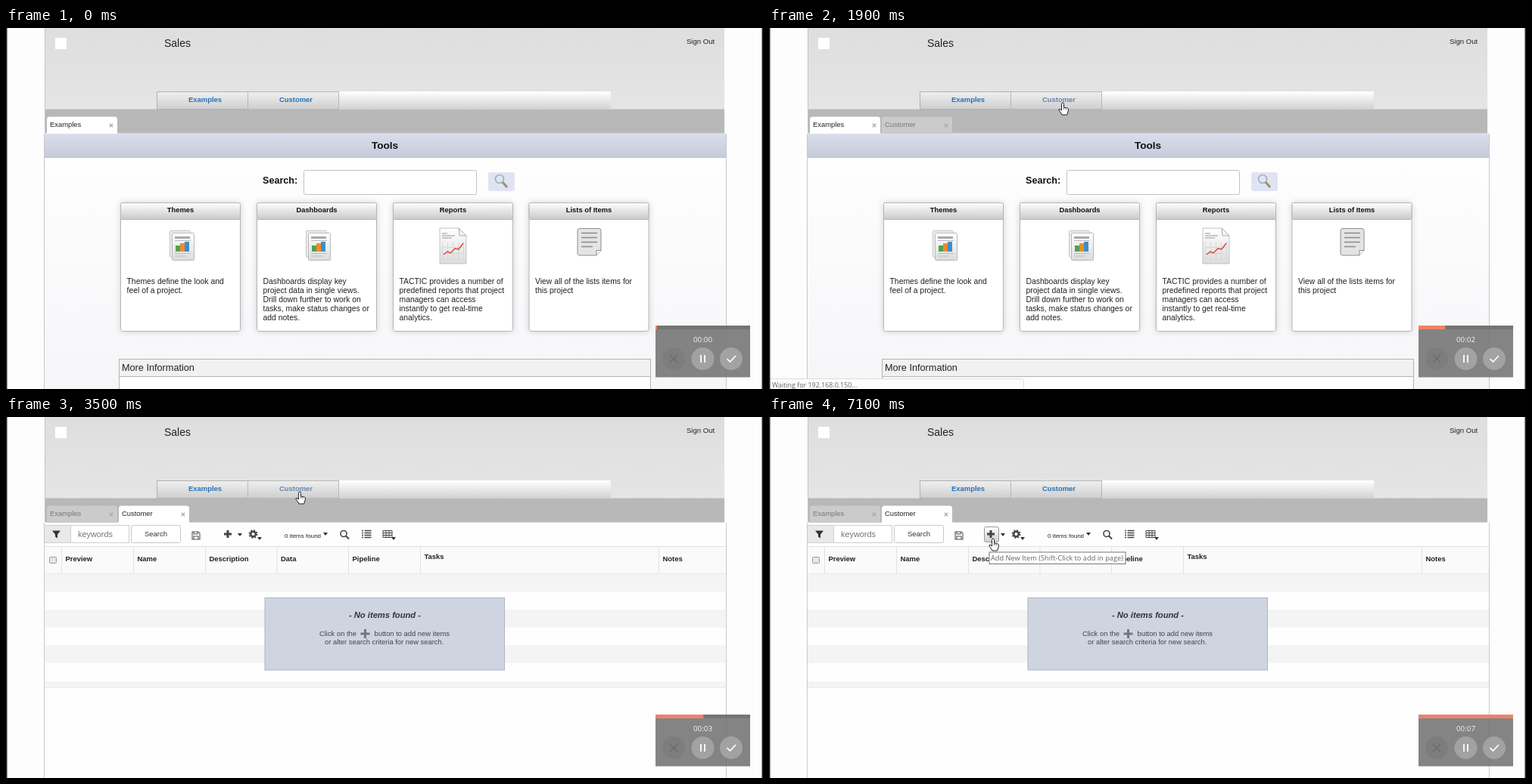
Write an HTML page that moves like this. It is 1000 px wide and 478 px high and loops after 7200 ms.

```html
<!DOCTYPE html>
<html lang="en">
<head>
<meta charset="utf-8">
<title>Sales tools</title>
<style>
html, body { margin: 0; width: 100%; height: 100%; overflow: hidden; background: #fdfdfd }
svg { display: block; width: 100vw; height: 100vh }
text { font-family: "Liberation Sans", Arial, sans-serif; white-space: pre }
.ui { font-family: "Open Sans", "Noto Sans", sans-serif }
.b { font-weight: bold }
.i { font-style: italic }
.m { text-anchor: middle }
</style>
</head>
<body>
<svg id="stage" viewBox="0 0 1000 478" preserveAspectRatio="none"></svg>
<script>
const LOOP = 7200, STEP = 100;

const rect = (x, y, w, h, fill, more = '') =>
  `<rect x="${x}" y="${y}" width="${w}" height="${h}" fill="${fill}" ${more}/>`;
const box = (x, y, w, h, fill, stroke, r = 0, more = '') =>
  rect(x + .5, y + .5, w - 1, h - 1, fill, `stroke="${stroke}" rx="${r}" ${more}`);
const text = (x, y, size, str, cls = '', fill = '#222', more = '') =>
  `<text x="${x}" y="${y}" font-size="${size}" class="${cls}" fill="${fill}" ${more}>${str}</text>`;
const path = (d, stroke, width = 1, fill = 'none') =>
  `<path d="${d}" stroke="${stroke}" stroke-width="${width}" fill="${fill}"/>`;
const circle = (x, y, r, fill, more = '') =>
  `<circle cx="${x}" cy="${y}" r="${r}" fill="${fill}" ${more}/>`;
const group = (id, body, more = '') => `<g id="${id}" ${more}>${body}</g>`;
const grad = (id, a, b) => `<linearGradient id="${id}" x2="0" y2="1">
  <stop stop-color="${a}"/><stop offset="1" stop-color="${b}"/></linearGradient>`;
const cross = (x, y, r, color, w = 1.3) =>
  path(`M${x - r} ${y - r}l${2 * r} ${2 * r}m0 ${-2 * r}l${-2 * r} ${2 * r}`, color, w);
const plus = (x, y, r, color) => path(`M${x - r} ${y}h${2 * r}M${x} ${y - r}v${2 * r}`, color, 3);
const caret = (x, y) => path(`M${x - 3} ${y}h6l-3 4z`, 'none', 0, '#333');

const defs = `<defs>
  ${grad('head', '#dedede', '#e5e5e5')}${grad('tab', '#f0f0f0', '#cecece')}
  ${grad('nav', '#ffffff', '#d2d2d2')}${grad('bar', '#d9deea', '#c6cbdb')}
  ${grad('page', '#ffffff', '#f6f5f8')}${grad('title', '#ffffff', '#c9c9c9')}
  ${grad('btn', '#ffffff', '#cfcfcf')}${grad('sheet', '#ffffff', '#dcdcdc')}
  <filter id="soft" x="-10%" y="-10%" width="120%" height="120%">
    <feDropShadow dx="0" dy="0" stdDeviation="4" flood-opacity=".16"/></filter>
</defs>`;

const header =
  rect(52, 0, 897, 108, 'url(#head)') + rect(52, 107.5, 897, 32, '#b8b8b8') +
  group('wide', rect(948, 0, 2.5, 108, '#e2e2e2') + rect(948, 107.5, 2.5, 32, '#b8b8b8')) +
  rect(51, 0, 1, 139, '#c4c4c4') +
  rect(65, 13, 15, 15, '#ffffff') +
  text(209, 24.5, 14, 'Sales') +
  group('signOut', text(899, 20.5, 9.55, 'Sign Out')) +
  group('nav',
    rect(439, 84, 360, 23.5, 'url(#nav)') +
    box(199, 84, 121, 24, 'url(#tab)', '#b0b0b0') + box(319, 84, 121, 24, 'url(#tab)', '#b8b8b8') +
    text(263, 98, 9.45, 'Examples', 'b m', '#2672b8') +
    text(383, 98, 9.45, 'Customer', 'b m', '#2672b8', 'id="link"'));

const pageTab = (id, x, label) => group(id,
  path(`M${x} 140V121q0-3.500 3.500-3.500h86q3.500 0 3.500 3.500V140z`, 'none', 0, '#fff') +
  text(x + 4, 131, 9.4, label) + cross(x + 85, 129, 2.2, '#aaa'));

const bars = (x, y) =>
  rect(x, y + 5, 6, 8, '#4fa34a') + rect(x + 6, y + 2, 6, 11, '#ef8a31') + rect(x + 12, y, 6, 13, '#3f8fc4');

const dashIcon = x =>
  box(x - 15, 268, 28, 36, '#eee', '#c4c4c4', 1) +
  box(x - 12, 271, 30, 37, 'url(#sheet)', '#b8b8b8', 1) +
  rect(x - 8, 276, 20, 3, '#aaa') + path(`M${x - 8} 281.500h21M${x - 8} 298.500h21M${x - 8} 302h15`, '#bbb') +
  bars(x - 7, 283);

const reportIcon =
  path('M573 265h25l10 10v37h-35z', '#c2c2c2', 1, 'url(#sheet)') +
  path('M598 265l1 10h9z', '#aaa', 1, '#f4f4f4') + path('M576 272h7M576 275h17M576 278h13', '#999', 1) +
  path('M576.500 283v23h28M583.500 283v23M590.500 283v23M597.500 283v23M604.500 283v23M576 290.500h28M576 298.500h28', '#d2d2d2', .7) +
  path('M578 300l5-4 4 2 6-6 5 1 6-8', '#d9403c', 1.4);

const listIcon =
  path('M758 265.500h25q3 0 3 3v26l-6 6.500h-22q-3 0-3-3v-29.500q0-3 3-3z', '#8c8c8c', 1, '#e4e4e4') +
  path('M786 294.500h-6v6.500', '#8c8c8c', 1, '#fff') +
  path('M760 271.500h21M760 277.500h21M760 283.500h21M760 289.500h15', '#8a8a8a', 1.5);

const card = (x, label, icon, lines, id) =>
  box(x, 231, 159, 171, '#fff', '#b5b5b5', 3, `filter="url(#soft)" ${id ? `id="${id}"` : ''}`) +
  box(x, 231, 159, 23, 'url(#title)', '#b5b5b5', 2) +
  text(x + 79.5, 244.3, 9.4, label, 'b m', '#111') + icon +
  lines.map((s, i) => text(x + 8.5, 338.5 + 12.1 * i, 10.4, s)).join('');

const tools = group('tools',
  rect(50, 140, 901, 338, 'url(#page)') + rect(50, 140, 901, 31, 'url(#bar)') +
  path('M50 171.500h901', '#c0c4d0') + path('M50.500 140v338M951.500 140v338', '#c8c8cc') +
  text(500.5, 160, 13.6, 'Tools', 'b m', '#111') +
  text(339, 205.500, 12.6, 'Search:', 'b', '#111') +
  box(393, 188, 229, 33, '#fff', '#c2c2c6', 2) +
  rect(637, 191, 35, 25, '#e0e4f2', 'rx="3"') +
  path('M656 204l6 7', '#a08b78', 3) + circle(652, 200, 5.500, '#d8e8f5', 'stroke="#a3abb8" stroke-width="1.500"') +
  card(151, 'Themes', dashIcon(231), ['Themes define the look and', 'feel of a project.']) +
  card(331, 'Dashboards', dashIcon(411), ['Dashboards display key', 'project data in single views.',
    'Drill down further to work on', 'tasks, make status changes or', 'add notes.']) +
  card(511, 'Reports', reportIcon, ['TACTIC provides a number of', 'predefined reports that project',
    'managers can access', 'instantly to get real-time', 'analytics.']) +
  card(690.5, 'Lists of Items', listIcon, ['View all of the lists items for', 'this project'], 'listCard') +
  box(149, 438, 703, 60, '#fdfdfd', '#b5b5b5') + box(149, 438, 703, 24, '#f1f1f1', '#b5b5b5') +
  text(153, 454, 12.7, 'More Information'));

const dots = Array.from({length: 8}, (_, i) => {
  const a = i * Math.PI / 4;
  return circle(3 * Math.cos(a), 3 * Math.sin(a), .7, '#555', `opacity="${i / 8}"`);
}).join('');

const loading = group('loading',
  box(49.5, 139, 904, 360, '#fefefe', '#bdbdbd', 3) +
  box(441, 140, 136, 21.5, '#efefef', '#9a9a9a') +
  group('spin', dots) + text(493, 153.5, 9.6, 'Loading ...', 'b', '#222'));

const columns = [['Preview', 73], ['Name', 168], ['Description', 263], ['Data', 357.5], ['Pipeline', 452], ['Tasks', 547], ['Notes', 862]];

const toolbar =
  box(50, 143, 36, 24, '#e9e9e9', '#d0d0d0') + path('M61 150.500h11l-4 5v5l-3-2v-3z', 'none', 0, '#333') +
  box(85, 143, 78, 24, '#fff', '#d0d0d0') + text(95, 158.500, 10.9, 'keywords', '', '#777') +
  box(165, 143, 66, 24, '#fff', '#c8c8c8', 2) + text(198, 157.8, 9.5, 'Search', 'm', '#333') +
  path('M246 152h8l2 2v8h-10zM248 152v3h5v-3M248 162v-4h6v4', '#555', 1.1) +
  group('addHover', box(284, 145, 20, 21, 'url(#btn)', '#999', 2)) +
  plus(293, 155, 5, '#444') + caret(309, 154) +
  circle(326.500, 155, 3.3, 'none', 'stroke="#444" stroke-width="2.400"') +
  circle(326.500, 155, 5, 'none', 'stroke="#444" stroke-width="1.800" stroke-dasharray="2 1.930"') + caret(335, 159) +
  text(368, 159.500, 8, '0 items found', '', '#222') + caret(422, 153) +
  circle(446, 154.500, 4, 'none', 'stroke="#444" stroke-width="1.600"') + path('M449 157.500l4 4', '#444', 2) +
  path('M470 150.500h2m1.500 0h9M470 153.500h2m1.500 0h9M470 156.500h2m1.500 0h9M470 159.500h2m1.500 0h9', '#444', 1.6) +
  path('M498 150.500h12v9h-12zM498 153.500h12M498 156.500h12M502 150v9M506 150v9', '#444', 1) + caret(512, 159);

const table = group('table',
  rect(50, 140, 901, 338, '#fefefe') + toolbar +
  rect(50, 171, 901, 37, '#fafafa') + path('M50 171.500h901M50 207.500h901', '#e2e2e2') +
  [207.5, 255, 302, 350].map((y, i) => rect(50, y, 901, i < 3 ? 23.700 : 8, '#f4f4f4')).join('') +
  path('M50 358h901', '#e4e4e4') +
  columns.map(([s, x]) => path(`M${x + .5} 171v37`, '#e2e2e2') +
    text(x + 5.500, s === 'Tasks' ? 187.500 : 191, 9.45, s, 'b', '#222')).join('') +
  box(57, 185, 10, 9, '#e6e6e6', '#999', 1) +
  path('M50.500 140v338M951.500 140v338', '#cacaca') +
  box(341.5, 239, 317.5, 96.5, '#cfd4e1', '#aeb3c2') +
  text(500.500, 266, 11.2, '- No items found -', 'b i m', '#333') +
  text(414, 290, 9.4, 'Click on the', '', '#444') + plus(474.500, 287, 6, '#777') +
  text(486.500, 290, 9.4, 'button to add new items', '', '#444') +
  text(421, 300.500, 9.4, 'or alter search criteria for new search.', '', '#444'));

const status = group('status', box(-1, 464, 338, 16, '#fcfcfc', '#dedede', 2) +
  text(4, 476, 8.9, 'Waiting for 192.168.0.150...', 'ui', '#666'));

const tooltip = group('tooltip', box(290.5, 178.5, 181, 16.5, '#fff', '#777') +
  text(293, 190.3, 9.25, 'Add New Item (Shift-Click to add in page)', 'ui', '#666'));

const recorder = rect(858, 394, 125, 68.5, '#737373', 'opacity=".88"') +
  rect(858, 394, 125, 5, '#747474') + rect(858, 394, 0, 5, '#ee8266', 'id="progress"') +
  text(920.5, 415.5, 9.8, '00:00', 'ui m', '#f4f4f4', 'id="clock"') +
  circle(882, 438, 15, '#7d7d7d') + cross(882, 438, 5, '#696969', 1.3) +
  circle(920.5, 438, 15, '#a2a2a2') + path('M918 433v10M923 433v10', '#fff', 1.8) +
  circle(958, 438, 15, '#a2a2a2') + path('M952.500 438l4 4 7.500-8', '#fff', 1.7);

const hand = group('hand', path(
  'M-1.500 10V1.500q0-1.500 1.500-1.500t1.500 1.500V6l4 .7q2 .5 2 2.300l-.8 4-1.200 3h-6.500l-1-2-3-4q-.5-1.500 1-1.800z',
  '#222', 1, '#fff') + path('M1.500 6v3M4 6.500v3', '#444', .8));
const arrow = group('arrow', path('M0 0v12l3-2.600 2 4.600 2-.9-2-4.400h4z', '#222', 1, '#fff'));

const stage = document.getElementById('stage');
stage.innerHTML = defs + rect(0, 0, 1000, 478, '#fdfdfd') + header +
  pageTab('tabA', 54, 'Examples') + pageTab('tabB', 149, 'Customer') +
  tools + loading + table + status + recorder + tooltip + hand + arrow +
  rect(0, 0, 1.5, 478, '#222') + rect(998.5, 0, 1.5, 478, '#222');

const el = Object.fromEntries([...stage.querySelectorAll('[id]')].map(e => [e.id, e]));
const show = (id, on) => el[id].style.display = on ? '' : 'none';
const move = (id, x, y) => el[id].setAttribute('transform', `translate(${x} ${y})`);

// time, x, y of the pointer tip
const route = [[200, 915, 422], [400, 790, 315], [600, 709, 268], [900, 396, 104], [1200, 388, 99],
  [4200, 388, 99], [4700, 297, 162], [5000, 297, 162], [5200, 296, 161], [LOOP, 296, 161]];
const ticks = [1000, 1800, 3000, 4000, 5000, 6000, 7000];

function pointer(t) {
  const i = Math.max(1, route.findIndex(p => p[0] >= t));
  const [a, b] = [route[i - 1], route[i]];
  const k = Math.max(0, (t - a[0]) / (b[0] - a[0]));
  return [a[1] + (b[1] - a[1]) * k, a[2] + (b[2] - a[2]) * k];
}

function setTab(id, on) {
  const [shape, label] = el[id].children;
  shape.setAttribute('fill', on ? '#fff' : '#cbcbcb');
  label.setAttribute('fill', on ? '#222' : '#777');
}

function draw(t) {
  const busy = t >= 2300 && t < 3100;
  show('tools', t < 2300);
  show('loading', busy);
  show('table', t >= 3100);
  show('wide', busy);
  show('tabB', t >= 1800);
  show('status', t >= 1800 && t < 2300);
  show('tooltip', t >= 5500);
  show('addHover', t >= 4600);
  move('nav', busy ? 1 : 0, 0);
  move('signOut', busy ? 2 : 0, 0);
  setTab('tabA', t < 2300);
  setTab('tabB', t >= 2300);
  el.spin.setAttribute('transform', `translate(480 150.500) rotate(${t * .45 + 90})`);

  const [x, y] = pointer(t);
  const onCard = t < 2300 && x > 690 && x < 850 && y > 231 && y < 402;
  const onLink = x > 319 && x < 439 && y > 84 && y < 108;
  const onAdd = t >= 4600;
  const isHand = onCard || onLink || onAdd;
  show('hand', t >= 200 && isHand);
  show('arrow', t >= 200 && !isHand);
  move('hand', x, y);
  move('arrow', x, y);
  el.listCard.setAttribute('fill', onCard ? '#e9e9e9' : '#fff');
  el.link.setAttribute('fill', onLink ? '#6886ad' : t > 4200 && t < 5300 ? '#70a2d8' : '#2672b8');

  el.progress.setAttribute('width', Math.min(125, 2 + t * .0175));
  el.clock.textContent = '00:0' + ticks.filter(s => t >= s).length;
}

const start = performance.now();
function frame(now) {
  const t = Math.max(0, now - start) % LOOP;
  draw(Math.floor(t / STEP) * STEP);
  requestAnimationFrame(frame);
}
draw(0);
requestAnimationFrame(frame);
</script>
</body>
</html>
```
